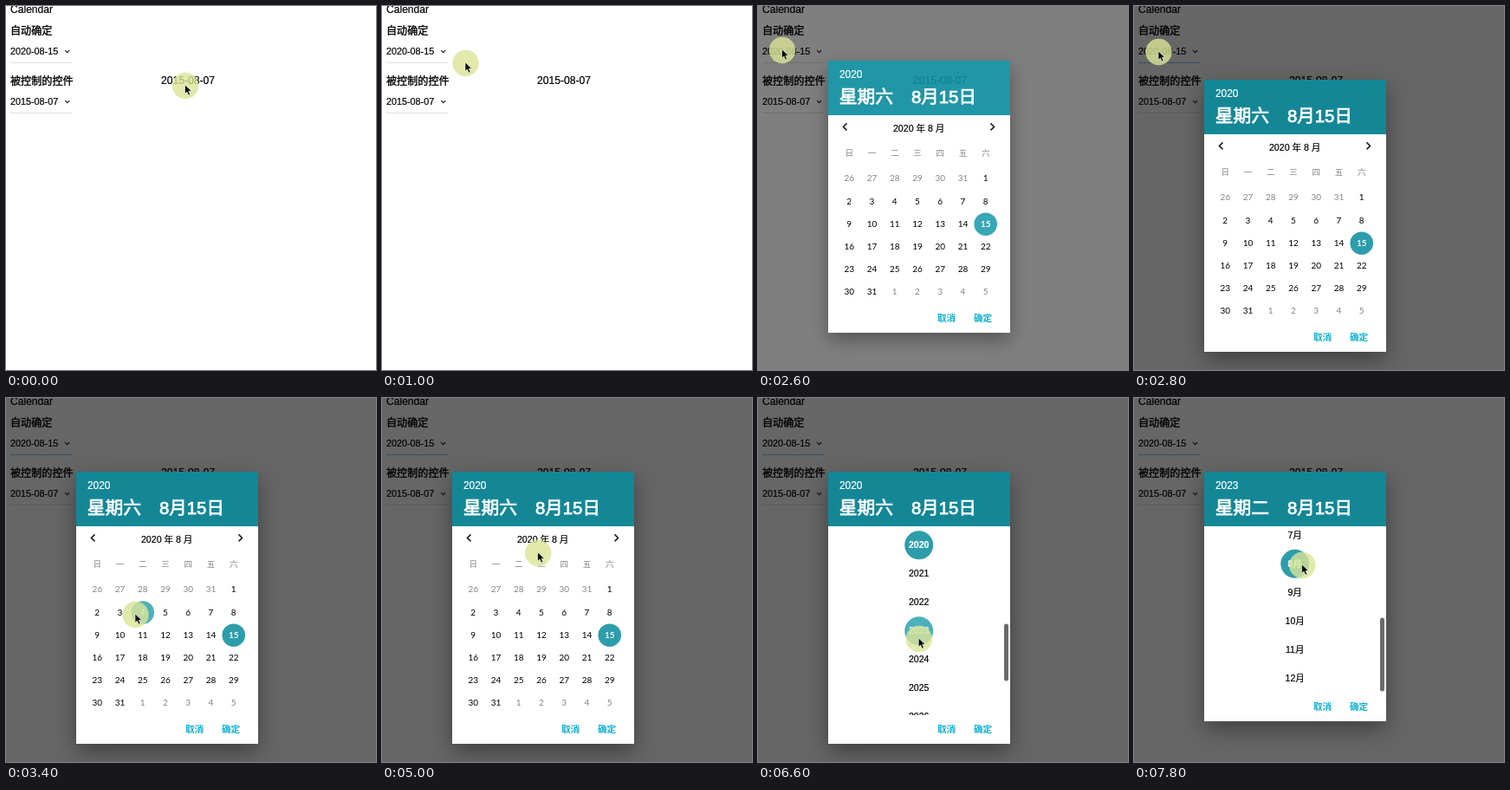
These frames come from a looping animation (427x420 px, 8000 ms). An HTML page:

```html
<!DOCTYPE html>
<html lang="zh-CN">
<head>
<meta charset="utf-8">
<title>Calendar</title>
<style>
html, body { margin: 0; width: 100%; height: 100%; overflow: hidden; background: #fff; }
body { position: relative; }
svg, #shade { position: absolute; left: 0; top: 0; }
svg { display: block; overflow: hidden; }
text { font-family: "Liberation Sans", "Noto Sans CJK SC", "Noto Sans CJK", sans-serif; fill: #000; white-space: pre; }
.mid { stroke: currentColor; stroke-width: .2px; }
.thick { stroke: currentColor; stroke-width: .35px; }
.title { stroke: currentColor; stroke-width: .75px; }
.day { font-family: Lato, sans-serif; }
.white { fill: #fff; color: #fff; }
.grey { fill: #858585; }
.action { fill: #12b0cf; font-weight: 700; }
#shade { width: 427px; height: 420px; background: #000; }
#dialog {
  position: absolute; left: 81px; width: 210px;
  background: linear-gradient(transparent 63px, #fff 63px);
  box-shadow: 0 9px 24px rgba(0,0,0,.38);
  --head: #138796; --pick: #2d9dab;
}
#dialog.opening {
  --head: rgba(16,154,173,.85); --pick: #38a7b5;
  box-shadow: 0 8px 20px rgba(0,0,0,.34);
}
#head { fill: var(--head); }
.cell circle { fill: none; }
.hot circle { fill: #4cb0bd; }
.on circle { fill: var(--pick); }
.hot text, .on text { fill: #fff; color: #fff; }
.on text { font-weight: 700; }
</style>
</head>
<body>
<svg id="page" width="427" height="420"></svg>
<div id="shade"></div>
<div id="dialog"><svg id="panel" width="210" height="314"></svg></div>
<svg id="pointer" width="427" height="420"></svg>
<script>
const LOOP = 8000;
const $ = id => document.getElementById(id);

function add(parent, tag, attrs = {}, content = '') {
  const el = document.createElementNS('http://www.w3.org/2000/svg', tag);
  for (const key in attrs) el.setAttribute(key, attrs[key]);
  el.textContent = content;
  parent.append(el);
  return el;
}
// cy is the vertical centre of the line
function label(parent, x, cy, str, size, cls = '', anchor = 'start') {
  return add(parent, 'text', { x, y: cy + size * .36, 'font-size': size, class: cls, 'text-anchor': anchor }, str);
}
const line = (parent, d, stroke, width) =>
  add(parent, 'path', { d, stroke, 'stroke-width': width, fill: 'none' });

// Page
const page = $('page');
function field(cy, value) {
  label(page, 5, cy - .2, value, 10.8, 'mid');
  line(page, `M68.2 ${cy - .8}l2.5 2.5 2.5-2.5`, '#222', 1.2);
  return line(page, `M5 ${cy + 13.5}H75.5`, '#e0e0e0', 1);
}
label(page, 5, 4, 'Calendar', 12.1, 'mid');
label(page, 5, 28.6, '自动确定', 12.1, 'thick');
const underline = field(52, '2020-08-15');
label(page, 5, 86.6, '被控制的控件', 12.1, 'thick');
label(page, 179, 86, '2015-08-07', 12.1, 'mid');
field(110, '2015-08-07');

// Dialog
const panel = $('panel');
add(panel, 'rect', { id: 'head', width: 210, height: 63 });
const yearText = label(panel, 13, 15.4, '2020', 11.9, 'white mid');
const weekText = label(panel, 12.7, 41.6, '星期六', 20.8, 'title white');
label(panel, 96, 41.6, '8月15日', 20.4, 'title white');
const actions = add(panel, 'g');
label(actions, 126, 297.3, '取消', 10.6, 'action');
label(actions, 168, 297.3, '确定', 10.6, 'action');

function cell(view, x, y, r, str, size, cls, chosen) {
  const g = add(view.g, 'g', { class: 'cell' });
  add(g, 'circle', { cx: x, cy: y + .5, r });
  label(g, x, y, str, size, cls, 'middle');
  view.cells.push({ g, x, y, r, chosen });
}
function makeView(attrs) {
  return { g: add(panel, 'g', attrs), cells: [] };
}

const days = makeView();
line(days.g, 'M21.5 72.4l-4 4 4 4', '#222', 1.6);
line(days.g, 'M187.5 72.4l4 4-4 4', '#222', 1.6);
label(days.g, 104.7, 77.7, '2020 年 8 月', 10.6, 'mid', 'middle');
const column = i => 24.2 + 26.25 * i;
[...'日一二三四五六'].forEach((ch, i) => label(days.g, column(i), 106.4, ch, 9.6, 'grey', 'middle'));
for (let i = 0; i < 42; i++) {
  const n = i - 5;
  const outside = n < 1 || n > 31;
  const num = n < 1 ? n + 31 : n > 31 ? n - 31 : n;
  cell(days, column(i % 7), 135.8 + 26.2 * Math.floor(i / 7), 13.3, num, 10,
    outside ? 'day grey' : 'day', n === 15);
}

function list(first, count, top, bottom, suffix, chosen, bar) {
  const id = 'clip' + first;
  const clip = add(panel, 'clipPath', { id });
  add(clip, 'rect', { y: 63, width: 210, height: bottom - 63 });
  const view = makeView({ 'clip-path': `url(#${id})` });
  for (let i = 0; i < count; i++) {
    const n = first + i;
    cell(view, 104.7, top + 33 * i, 16.5, n + suffix, 10.5, 'mid', n === chosen);
  }
  add(view.g, 'rect', { x: 203, y: bar[0], width: 5, height: bar[1], rx: 2.5, fill: '#6b6b6b' });
  return view;
}
const years = list(2020, 7, 84.3, 281, '', 2020, [175.5, 66]);
const months = list(7, 6, 72.8, 255, '月', 8, [168.5, 85]);
const views = [days, years, months];

// Pointer
const pointer = add($('pointer'), 'g');
add(pointer, 'circle', { cx: .5, cy: 1, r: 15.2, fill: 'rgba(219,229,150,.8)' });
add(pointer, 'path', {
  d: 'M0 0v10.2l2.4-2.2 1.7 4 1.9-.8-1.7-3.9h3.3z',
  fill: '#000', stroke: '#fff', 'stroke-width': .6
});

// Pointer stops: time, x, y
const stops = [
  [0, 206.5, 91], [600, 192, 87], [800, 150, 77], [1000, 96, 65], [1200, 52, 55], [1400, 37, 53],
  [1800, 31, 51], [2000, 27.5, 50], [2800, 28, 52], [3000, 52, 96], [3200, 112, 196],
  [3400, 149, 249], [3800, 156, 254], [4000, 168, 258], [4200, 180, 254], [4400, 187, 240],
  [4600, 189, 220], [4800, 186, 198], [5000, 179.7, 178], [5200, 152, 140], [5400, 118, 108],
  [5600, 108, 100], [6200, 124, 135], [6400, 160, 218], [6600, 185.3, 277],
  [7600, 190, 236], [7800, 193.7, 192]
];

function draw(t) {
  const [, x, y] = stops.filter(s => s[0] <= t).pop();
  pointer.setAttribute('transform', `translate(${x} ${y})`);

  const open = t >= 2600;
  const opening = open && t < 2800;
  const top = opening ? 63 : 85;
  const view = t >= 7200 ? months : t >= 5800 ? years : days;
  const height = view === months ? 288 : 314;

  $('shade').style.opacity = !open ? 0 : opening ? .5 : .6;
  underline.setAttribute('stroke', open && !opening ? '#80c0ff' : '#e0e0e0');

  const dialog = $('dialog');
  dialog.style.display = open ? 'block' : 'none';
  dialog.style.top = top + 'px';
  dialog.style.height = height + 'px';
  dialog.classList.toggle('opening', opening);
  actions.setAttribute('transform', `translate(0 ${height - 314})`);
  yearText.textContent = view === months ? '2023' : '2020';
  weekText.textContent = view === months ? '星期二' : '星期六';

  for (const v of views) v.g.style.display = v === view ? '' : 'none';
  for (const c of view.cells) {
    const near = Math.hypot(x - 81 - c.x, y - top - c.y) < c.r;
    c.g.setAttribute('class', 'cell' + (c.chosen ? ' on' : near ? ' hot' : ''));
  }
}

const start = performance.now();
let last = -1;
function tick() {
  const t = Math.max(0, performance.now() - start) % LOOP;
  const step = Math.floor(t / 200);
  if (step !== last) draw((last = step) * 200);
  requestAnimationFrame(tick);
}
tick();
</script>
</body>
</html>
```
